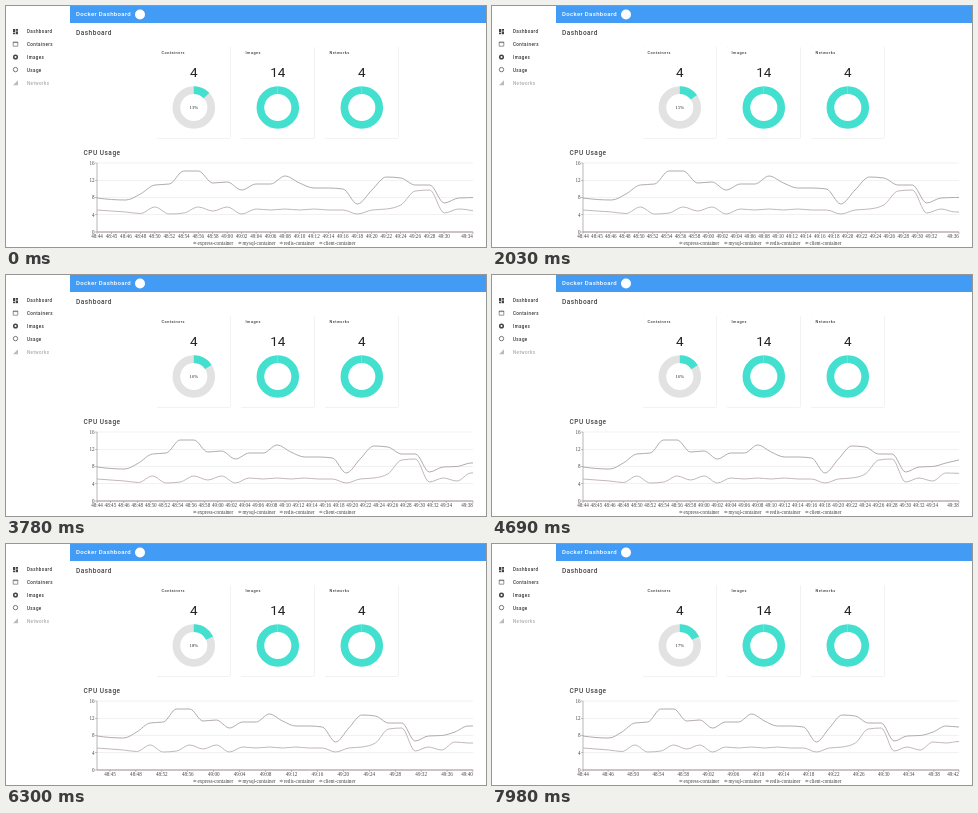
An HTML page that plays this animation: 480 by 241 pixels, repeating every 8000 ms.

```html
<!DOCTYPE html>
<html lang="en">
<head>
<meta charset="utf-8">
<title>Dashboard</title>
<style>
  html, body { margin: 0; width: 100%; height: 100%; overflow: hidden; background: #fff; }
  svg { display: block; width: 480px; height: 241px; font-family: Roboto, sans-serif; fill: #333; }
  .menu { font-size: 4.5px; font-weight: 500; letter-spacing: .4px; }
  .heading { font-size: 6.5px; font-weight: 500; letter-spacing: .5px; fill: #444; }
  .label { font-size: 3.8px; font-weight: 500; letter-spacing: .5px; }
  .count { font-size: 13.5px; text-anchor: middle; fill: #222; }
  .axis { font: 5.1px "Liberation Serif", serif; fill: #444; }
  .mid { text-anchor: middle; }
  .end { text-anchor: end; }
  .line { fill: none; stroke-width: .9; clip-path: url(#plot); }
  .bar { fill: #429cf5; filter: drop-shadow(0 .5px .6px #0004); }
  .card { fill: #fff; filter: drop-shadow(0 .8px .6px #0003); }
</style>
</head>
<body>
<svg id="stage" viewBox="0 0 480 241"></svg>
<script>
const stage = document.getElementById('stage');
const LEFT = 91, WIDTH = 376, BASE = 226, HEIGHT = 69;
const DELAY = 300, DURATION = 1400, LOOP = 8000;
const ARC_DELAY = 400, ARC_DURATION = 200;

// Pixel heights of the two busy containers, one sample per tick.
const series = [
  [192, 193.5, 194, 188, 179, 178, 165, 165, 177, 176, 184, 178, 178, 170, 177, 182,
    182, 183, 198, 184, 171, 172, 179, 179, 197, 192, 191.5, 188, 182, 183, 182],
  [204, 205, 206, 207.5, 201, 208, 207, 201, 205, 201, 208, 203, 204, 203, 204, 203,
    204, 204, 208, 204, 203, 199, 185, 184, 207, 203, 206, 198, 199, 197.5, 196],
];
const lineColors = ['#aaa1a7', '#bcaeb7'];
// Each update adds one sample: arrival time, last sample, CPU percentage.
const updates = [[-1500, 26, 13], [1470, 27, 15], [3290, 28, 16], [5670, 29, 18], [7770, 30, 17]];

function add(tag, attrs, text) {
  const node = document.createElementNS('http://www.w3.org/2000/svg', tag);
  for (const key in attrs) node.setAttribute(key, attrs[key]);
  if (text !== undefined) node.textContent = text;
  return stage.appendChild(node);
}
const rect = (x, y, width, height, fill) => add('rect', { x, y, width, height, fill });
const write = (text, x, y, cls, fill) =>
  add('text', fill ? { x, y, class: cls, style: `fill:${fill}` } : { x, y, class: cls }, text);
const ring = (cx, cy, r, stroke, width) =>
  add('circle', { cx, cy, r, fill: 'none', stroke, 'stroke-width': width });

function drawFrame() {
  rect(0, 0, 480, 241, '#fff');
  add('rect', { x: 64, y: 0, width: 416, height: 17, class: 'bar' });
  add('text', { x: 70, y: 10.4, 'font-size': 6, 'font-weight': 500, 'letter-spacing': .35, style: 'fill:#fff' }, 'Docker Dashboard');
  add('circle', { cx: 134, cy: 8.5, r: 5, fill: '#fff' });

  ['Dashboard', 'Containers', 'Images', 'Usage', 'Networks'].forEach((name, i) =>
    write(name, 21, 26.8 + 13 * i, 'menu', i === 4 ? '#aaa' : '#333'));
  rect(7, 23, 2.2, 3, '#444');
  rect(9.8, 23, 2.2, 1.8, '#444');
  rect(7, 26.6, 2.2, 1.6, '#444');
  rect(9.8, 25.4, 2.2, 2.8, '#444');
  add('path', { d: 'M7.2 36h4.6v4.2H7.2zM7 36.6h5', fill: 'none', stroke: '#555', 'stroke-width': .6 });
  ring(9.5, 51, 1.8, '#444', 1.5);
  ring(9.5, 63.6, 2.2, '#444', .7);
  add('path', { d: 'M7 79.3L12 74.3V79.3Z', fill: '#bbb' });

  write('Dashboard', 70, 29.2, 'heading');
  write('CPU Usage', 77.5, 149.2, 'heading');
}

function drawCards() {
  [['Containers', 4], ['Images', 14], ['Networks', 4]].forEach(([name, count], i) => {
    const x = 151 + 84 * i, cx = x + 36.8;
    add('rect', { x, y: 41, width: 73.5, height: 91.5, rx: 1, class: 'card' });
    write(name, x + 4.5, 48.2, 'label');
    write(count, cx, 71, 'count');
    ring(cx, 101.5, 17.4, i ? '#43dfcf' : '#e2e2e2', 7.7);
    if (i) rect(cx - .2, 80.2, .4, 7.7, '#a5eee6');
  });
}

function drawChart() {
  for (let i = 0; i < 5; i++) {
    const y = BASE - HEIGHT * i / 4;
    rect(LEFT, y - .25, WIDTH, .5, '#e2e2e2');
    rect(LEFT - 2, y - .25, 2, .5, '#888');
    write(4 * i, LEFT - 2.5, y + 1.9, 'axis end');
  }
  rect(LEFT - .3, BASE - HEIGHT, .6, HEIGHT, '#888');
  rect(LEFT, BASE - .5, WIDTH, 1, '#a58e9d');
  [['express', 187], ['mysql', 232], ['redis', 273.5], ['client', 313]].forEach(([name, x]) => {
    add('path', { d: `M${x} 237h3.6`, stroke: '#777', 'stroke-width': .7 });
    ring(x + 1.8, 237, .8, '#777', .5);
    write(name + '-container', x + 4.4, 238.5, 'axis');
  });
  add('clipPath', { id: 'plot' }).append(rect(LEFT, 150, WIDTH, 80, '#000'));
}

drawFrame();
drawCards();
drawChart();
const curves = lineColors.map(stroke => add('path', { class: 'line', stroke }));
const arc = add('circle', {
  cx: 187.8, cy: 101.5, r: 17.4, fill: 'none', stroke: '#43dfcf', 'stroke-width': 7.7,
  pathLength: 100, transform: 'rotate(-90 187.8 101.5)',
});
const percent = write('', 187.8, 103.2, 'axis mid', '#222');
percent.style.fontSize = '4.6px';
const ticks = Array.from({ length: 31 }, () => ({
  mark: rect(0, BASE, .5, 2, '#888'), text: write('', 0, 232, 'axis mid'),
}));

// The standard CSS "ease" curve, solved by bisection.
function ease(x) {
  if (x <= 0) return 0;
  if (x >= 1) return 1;
  let lo = 0, hi = 1, u = .5;
  for (let i = 0; i < 20; i++) {
    u = (lo + hi) / 2;
    if (.75 * u * (1 - u) + u ** 3 < x) lo = u; else hi = u;
  }
  return .3 * u * (1 - u) ** 2 + 3 * u * u * (1 - u) + u ** 3;
}
const mix = (a, b, p) => a + (b - a) * p;

function clock(i) {
  const s = 48 * 60 + (i < 2 ? 44 + i : 42 + 2 * i);
  return `${Math.floor(s / 60)}:${String(s % 60).padStart(2, '0')}`;
}

// Monotone cubic interpolation through the points.
function monotonePath(pts) {
  const last = pts.length - 1;
  const step = i => pts[i + 1][0] - pts[i][0];
  const slope = i => (pts[i + 1][1] - pts[i][1]) / step(i);
  const tangent = pts.map((_, i) => {
    if (i === 0 || i === last) return 0;
    const a = slope(i - 1), b = slope(i), h = step(i - 1), k = step(i);
    const mean = Math.abs((a * k + b * h) / (h + k)) / 2;
    return (Math.sign(a) + Math.sign(b)) * Math.min(Math.abs(a), Math.abs(b), mean);
  });
  tangent[0] = (3 * slope(0) - tangent[1]) / 2;
  tangent[last] = (3 * slope(last - 1) - tangent[last - 1]) / 2;
  let d = `M${pts[0]}`;
  for (let i = 0; i < last; i++) {
    const [x0, y0] = pts[i], [x1, y1] = pts[i + 1], h = step(i) / 3;
    d += `C${x0 + h},${y0 + h * tangent[i]} ${x1 - h},${y1 - h * tangent[i + 1]} ${x1},${y1}`;
  }
  return d;
}

function drawTicks(n) {
  ticks.forEach(({ mark, text }, i) => {
    const shown = i === n || (n < 29 ? i < n - 1 : i < n && (n - i) % 2 === 0);
    mark.style.display = text.style.display = shown ? '' : 'none';
    const x = LEFT + WIDTH * i / n;
    mark.setAttribute('x', x - .25);
    text.setAttribute('x', Math.min(x, LEFT + WIDTH - 6));
    text.textContent = clock(i);
  });
}

let shownCount = 0;
function render() {
  const t = performance.now() % LOOP;
  const current = updates.filter(u => u[0] <= t).length - 1;
  const [start, n, value] = updates[current];
  const age = t - start;
  const p = ease((age - DELAY) / DURATION);

  // Old samples close up while the new one slides in from far right.
  series.forEach((ys, s) => {
    const pts = ys.slice(0, n + 1).map((y, i) => {
      const from = i < n ? i / (n - 1) : 2.3;
      return [LEFT + WIDTH * mix(from, i / n, p), y];
    });
    curves[s].setAttribute('d', monotonePath(pts));
  });

  const before = current ? updates[current - 1][2] : value;
  const share = mix(before, value, ease((age - ARC_DELAY) / ARC_DURATION));
  arc.setAttribute('stroke-dasharray', `${share} 100`);
  percent.textContent = value + '%';
  if (n !== shownCount) drawTicks(shownCount = n);
  requestAnimationFrame(render);
}
render();
</script>
</body>
</html>
```
